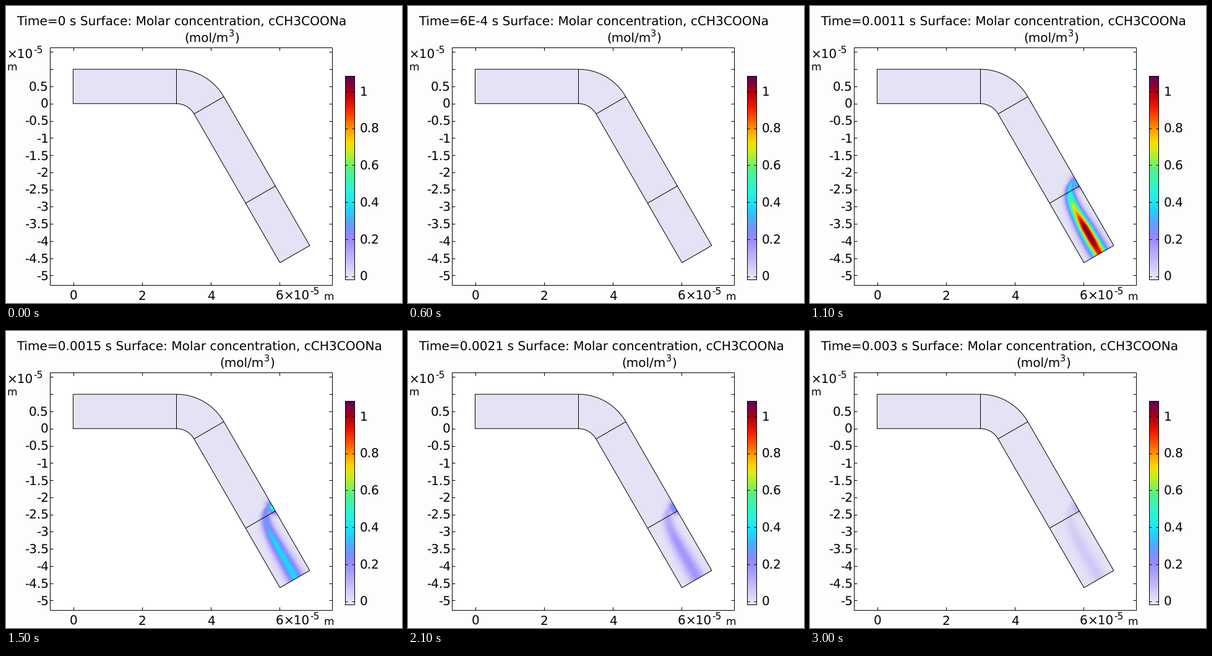
These frames come from a looping animation (640x480 px, 3.1 s). A matplotlib script:

```python
import numpy as np
import matplotlib.pyplot as plt
from matplotlib.animation import FuncAnimation
from matplotlib.colors import LinearSegmentedColormap, Normalize
from matplotlib.patches import Polygon, Rectangle

W, H, DPI = 640, 480, 100
FRAMES, INTERVAL = 31, 100
UNIT = 55.53                 # pixels per 1e-5 m
X0, Y0 = 108.5, 157.75       # pixel position of the data origin
VMIN, VMAX = -0.018, 1.083
TITLE_SIZE = 20.08

plt.rcParams.update({
    "font.family": "DejaVu Sans",
    "text.kerning_factor": 6,
    "text.hinting": "none",
})

STOPS = [
    (-0.018, "#e6e4f5"), (0.0, "#e4e2f5"), (0.1, "#c0b4fa"),
    (0.2, "#968cff"), (0.25, "#7d8fff"), (0.3, "#4faaff"),
    (0.36, "#23d2fa"), (0.4, "#1ee4f0"), (0.45, "#28f2dc"),
    (0.52, "#3cf5b4"), (0.58, "#5af082"), (0.64, "#a0f03c"),
    (0.69, "#dcea14"), (0.73, "#fad700"), (0.78, "#ffaa00"),
    (0.85, "#fc5c00"), (0.92, "#ee1900"), (1.0, "#aa0014"),
    (1.083, "#5f005f"),
]
norm = Normalize(VMIN, VMAX, clip=True)
cmap = LinearSegmentedColormap.from_list(
    "light_rainbow",
    [((v - VMIN) / (VMAX - VMIN), c) for v, c in STOPS], N=512)

fig = plt.figure(figsize=(W / DPI, H / DPI), dpi=DPI, facecolor="#fdfdfd")
ax = fig.add_axes([0, 0, 1, 1])
ax.axis("off")


def text_width(s, size=20):
    narrow = {".": 0.318, "-": 0.361, "E": 0.632}
    return size * sum(narrow.get(ch, 0.636) for ch in s)


def label(x, y, s, size=20):
    return ax.text(x, y, s, fontsize=size * 72 / DPI, color="black",
                   ha="left", va="baseline", zorder=6)


def line(xs, ys):
    ax.plot(xs, ys, color="black", lw=0.72, zorder=5,
            solid_capstyle="butt", solid_joinstyle="miter")


def to_px(x, y):
    return X0 + np.asarray(x) * UNIT, Y0 - np.asarray(y) * UNIT


# Plot frame, ticks and tick labels
LEFT, RIGHT, TOP, BOTTOM = 71, 527, 67, 451
ax.add_patch(Rectangle((LEFT, TOP), RIGHT - LEFT, BOTTOM - TOP,
                       facecolor="white", edgecolor="black", lw=0.72))
for v in np.arange(-5, 1.6, 0.5):
    y = to_px(0, v)[1]
    line([LEFT, LEFT + 5], [y, y])
    line([RIGHT - 5, RIGHT], [y, y])
    if v < 0.9:
        s = f"{v:g}"
        label(68.6 - text_width(s), y + 7.4, s)
for v in (0, 2, 4, 6):
    x = to_px(v, 0)[0]
    line([x, x], [TOP, TOP + 5])
    line([x, x], [BOTTOM - 5, BOTTOM])
    label(x - 5.9, 475, str(v))

label(1, 85, "×10")
label(44, 76, "-5", 15.5)
label(1.5, 104, "m", 17)
label(448, 475, "×10")
label(491.5, 466, "-5", 15.5)
label(513.5, 475, "m", 17)

# Colour bar
BAR_L, BAR_R, BAR_T, BAR_B = 548, 563, 113, 442
ramp = np.linspace(VMAX, VMIN, 329)[:, None]
ax.imshow(ramp, cmap=cmap, norm=norm, aspect="auto",
          extent=(BAR_L, BAR_R, BAR_B, BAR_T), zorder=2)
ax.add_patch(Rectangle((BAR_L, BAR_T), BAR_R - BAR_L, BAR_B - BAR_T,
                       fill=False, edgecolor="black", lw=0.72, zorder=5))
for v in (0, 0.2, 0.4, 0.6, 0.8, 1):
    y = 436.8 - 299 * v
    line([BAR_L, BAR_L + 4], [y, y])
    line([BAR_R - 4, BAR_R], [y, y])
    label(571.3, y + 7.4, f"{v:g}")

# Duct: straight inlet, 60 degree bend, two straight outlet pieces
ALONG = np.array([0.5, -np.sqrt(3) / 2])
bend = np.radians(np.linspace(90, 30, 40))


def wall(radius):
    arc = np.column_stack([3 + radius * np.cos(bend),
                           -0.6 + radius * np.sin(bend)])
    return np.vstack([[0, radius - 0.6], arc,
                      arc[-1] + 3 * ALONG, arc[-1] + 5 * ALONG])


inner, outer = wall(0.6), wall(1.6)
outline = np.column_stack(to_px(*np.vstack([outer, inner[::-1]]).T))
ax.add_patch(Polygon(outline, facecolor=cmap(norm(0)), edgecolor="none",
                     zorder=2))
ax.add_patch(Polygon(outline, fill=False, edgecolor="black", lw=0.72,
                     zorder=5))
for i in (1, -3, -2):
    line(*to_px(*np.array([inner[i], outer[i]]).T))

# Pixel grid in outlet coordinates: u downstream, n away from the inner wall
GX0, GX1, GY0, GY1 = 380, 500, 240, 425
gx, gy = np.meshgrid(np.arange(GX0, GX1, 0.5) + 0.25,
                     np.arange(GY0, GY1, 0.5) + 0.25)
jx, jy = to_px(*inner[-2])
u = 0.5 * (gx - jx) + 0.866 * (gy - jy)
n = 0.866 * (gx - jx) - 0.5 * (gy - jy)


def smooth(x):
    x = np.clip(x, 0, 1)
    return x * x * (3 - 2 * x)


def level(t, times, values):
    return np.exp(np.interp(t, times, np.log(values)))


def plume(t):
    """Concentration in the outlet at t, in units of 1e-4 s."""
    if t < 10:
        return np.zeros_like(u)
    peak = level(t, [10, 11, 15, 19, 25, 30],
                 [0.7, 1.06, 0.37, 0.22, 0.115, 0.055])
    spot_peak = level(t, [10, 11, 15, 19, 25, 30],
                      [0.28, 0.35, 0.48, 0.38, 0.19, 0.1])
    centre = np.minimum(29.5 + 8 * np.exp(-u / 14), 54)
    spread = 6.2 + 2.2 * smooth(u / 110)
    across = np.exp(-0.5 * (np.abs(n - centre) / spread) ** 2)
    hot = np.clip(0.42 + 0.0095 * u, 0.38, 1) - 0.1 * smooth((u - 82) / 28)
    cool = 0.72 + 0.28 * smooth(u / 50)
    mix = np.clip((13 - t) / 2, 0, 1)
    fade = np.exp(-(np.minimum(u + 8, 0) / 9) ** 2)
    band = peak * (mix * hot + (1 - mix) * cool) * across * fade
    spot = spot_peak * np.exp(-((u + 7) / 10) ** 2 - ((n - 54) / 8) ** 2)
    return np.maximum(band, spot)


surface = ax.imshow(plume(0), cmap=cmap, norm=norm, aspect="auto",
                    extent=(GX0, GX1, GY1, GY0), zorder=3,
                    interpolation="bilinear")
surface.set_clip_path(Polygon(outline, transform=ax.transData))
ax.set_xlim(0, W)
ax.set_ylim(H, 0)

title = label(17, 31, "", TITLE_SIZE)
unit_parts = [(label(0, 57, "(mol/m"), 288.4),
              (label(0, 49, "3", 14.5), 359.8),
              (label(0, 57, ")"), 369)]


def time_label(k):
    return f"{k}E-4" if 0 < k < 10 else f"{k / 1e4:g}"


def update(k):
    s = time_label(k)
    title.set_text(f"Time={s} s Surface: Molar concentration, cCH3COONa")
    shift = text_width(s) - text_width("0")
    for part, x in unit_parts:
        part.set_x(x + shift)
    surface.set_data(plume(k))
    return [title, surface] + [part for part, _ in unit_parts]


anim = FuncAnimation(fig, update, frames=FRAMES, interval=INTERVAL,
                     repeat=True, repeat_delay=0, blit=False)
plt.show()
```
